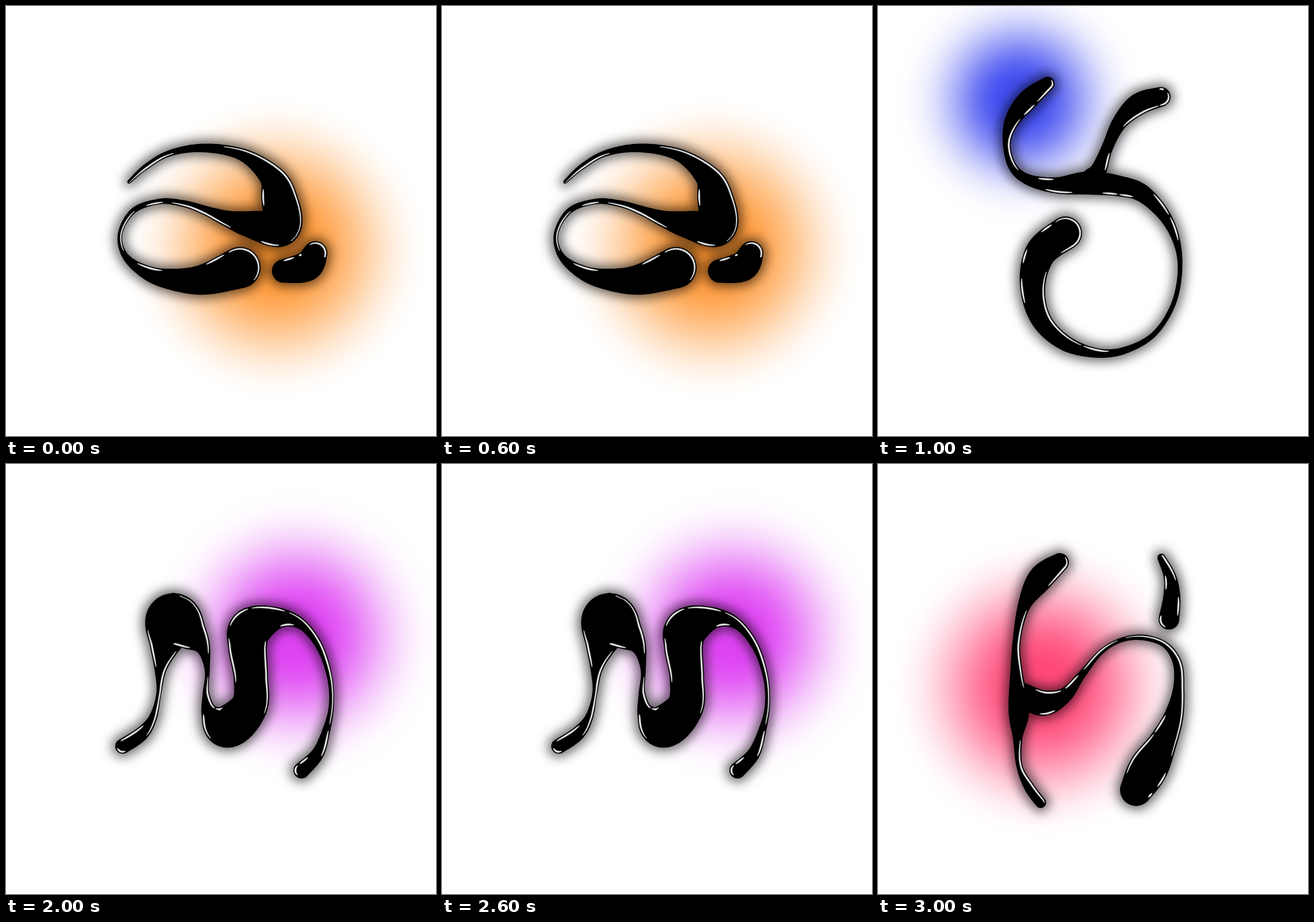
An HTML page with a canvas for the animation above (4 s loop, 748 px wide and 748 px high).

```html
<!DOCTYPE html>
<html lang="en">
<head>
<meta charset="utf-8">
<title>Liquid glyphs</title>
<style>
html, body { margin: 0; width: 100%; height: 100%; overflow: hidden; background: #fff }
canvas { display: block }
</style>
</head>
<body>
<canvas id="stage" width="748" height="748"></canvas>
<script>
const SIZE = 748, HOLD = 1000;
const ctx = document.getElementById('stage').getContext('2d');

// A stroke is a spine of "x,y,radius" keys plus the "from:to" spans of its rim that shine.
// Rim position u, with n the last key: 0..n left side, n..n+1 end cap,
// n+1..2n+1 right side backwards, -1..0 start cap.
const split = (text, mark) => text.trim().split(/\s+/).map(p => p.split(mark).map(Number));
const stroke = (keys, shine) => ({ keys: split(keys, ','), shine: split(shine, ':') });

const glyphs = [
  {
    glow: { x: 470, y: 422, r: 272, rgb: '255,150,50', power: 1.05 },
    strokes: [
      stroke(`214,306,3 243,280,5 285,256,5.5 345,247,7.5 412,259,11 461,296,21 475,333,31 478,384,34
              425,380,23 385,370,14 345,355,8 310,344,6 268,340,4.8 222,356,5 198.5,397,4 209,437,6
              250,466,13 300,477,20 348,475,27 407,455,36`,
             '3.5:7 7.15:7.5 8.7:11.5 11.9:12.5 13:14.7 15.5:16.4 18.2:18.7 18.9:19.8 32.8:33.3 36.9:39'),
      stroke('483,461,20.5 523,453,26 538,430,21', '.2:.6 .9:1.2 2.1:3.2')
    ]
  },
  {
    glow: { x: 247, y: 164, r: 246, rgb: '66,78,240', power: 1.9 },
    strokes: [
      stroke(`295,135,12 261,163,17.5 234,198,13 224,238,7 234,279,7.5 261,302,9.5 310,312,14 365,308,20
              418,313,18 463,328,15 506,377,9.5 525,440,4.5 516.5,511,4 483,568,4.5 435,597,6 385,604,8
              327,587,13.5 284,546,17.5 269,487,22 283,429,27 326,395,29`,
             `-.5:.8 1:1.5 1.8:4.3 5.4:5.9 9.2:9.8 9.9:10.5 17.6:18.2 18.6:18.9 19.4:19.7 20:21.5
              22.5:25.4 25.5:26.3 32.4:32.9 33:33.5 34.5:35.3`),
      stroke('492,158,17 453,171,19 420,203,13 399,246,10 384,285,14 372,300,18',
             '-.95:-.8 -.55:.2 .3:2 3.2:3.9')
    ]
  },
  {
    glow: { x: 506, y: 299, r: 270, rgb: '222,68,243', power: 1.4 },
    strokes: [
      stroke(`203,491,13 236,469,12 256,440,7 266,398,4.5 269,355,11 277,312,27 290,271,46 318,292,30
              342,318,13 350,358,4.5 348,400,6 356,435,16 385,457,36.5 423,422,32 426,372,30 420,315,34
              427,285,36 472,268,18.5 513,278,9.5 545,317,6.5 563,370,4.8 566,420,4.5 557,464,7
              542,504,11 514,533,14`,
             `-.95:-.45 .1:1.3 4.1:5.6 6.1:8.3 9.3:11 11.2:12.2 13.9:15.4 15.7:16.1 16.2:17.2 17.4:21.7
              22:23 24.5:25 25.2:25.6 31.3:32 33.7:36 37.2:38 41.8:42.7 44:47.9`)
    ]
  },
  {
    glow: { x: 284, y: 388, r: 273, rgb: '255,72,120', power: 1.15 },
    strokes: [
      stroke(`316,171,16 283,199,22 254,247,11 241,310,7 241,365,11 245,428,18 243,476,8.5 246,525,5.5
              263,562,9 283,589,9.5`,
             '-.5:1 2.1:4.4 6.1:9.2'),
      stroke(`252,402,21 288,416,22 325,402,13 354,367,7 388,327,4.5 424,306,4 463,302,5 500,315,5.5
              521,347,8 523,392,10 514,440,17 494,487,25 470,530,34 449,567,28`,
             '.5:1.9 2.2:2.9 3.2:4.8 5.2:11.3 11.9:12.3 12.6:12.8 14.6:16.1 16.2:16.9 25.7:26.1'),
      stroke('493,163,7 508,197,11 511,233,15 506,270,18', '-.3:1.2 2:2.7 3.6:4.1 5.4:6.1')
    ]
  }
];

const clamp = (v, lo, hi) => Math.max(lo, Math.min(hi, v));

// Catmull-Rom spine: [x, y, radius] at key position k
function spine(keys, k) {
  const last = keys.length - 1;
  const i = clamp(Math.floor(k), 0, last - 1), t = k - i;
  const [a, b, c, d] = [-1, 0, 1, 2].map(j => keys[clamp(i + j, 0, last)]);
  return b.map((v, j) => v + t / 2 * (c[j] - a[j]
    + t * (2 * a[j] - 5 * v + 4 * c[j] - d[j] + t * (3 * (v - c[j]) + d[j] - a[j]))));
}

// Point just inside the outline at rim position u, with the local radius
function rim(keys, u) {
  const n = keys.length - 1;
  const k = clamp(u > n + 1 ? 2 * n + 1 - u : u, 0, n);
  const [x, y, r] = spine(keys, k);
  const p = spine(keys, Math.max(0, k - .01)), q = spine(keys, Math.min(n, k + .01));
  const [dx, dy, dr] = q.map((v, j) => v - p[j]);
  const side = Math.acos(clamp(-dr / Math.hypot(dx, dy), -.95, .95));
  let turn = side;
  if (u < 0) turn = side - u * 2 * (Math.PI - side);
  else if (u > n) turn = side * (1 - 2 * Math.min(1, u - n));
  const angle = Math.atan2(dy, dx) - turn, inner = r - Math.min(3.4, r * .6);
  return [x + inner * Math.cos(angle), y + inner * Math.sin(angle), r];
}

function drawGlow({ x, y, r, rgb, power }) {
  const g = ctx.createRadialGradient(x, y, 0, x, y, r);
  for (let t = 0; t <= 1; t += 1 / 32) {
    const fall = clamp((t - .1) / .9, 0, 1);
    const alpha = ((1 + Math.cos(Math.PI * fall)) / 2) ** power;
    g.addColorStop(t, `rgba(${rgb},${alpha.toFixed(4)})`);
  }
  ctx.fillStyle = g;
  ctx.fillRect(0, 0, SIZE, SIZE);
}

function fillStrokes(strokes, spread, shift = 0) {
  ctx.fillStyle = '#000';
  ctx.beginPath();
  for (const { keys } of strokes) {
    const steps = (keys.length - 1) * 40;
    for (let s = 0; s <= steps; s++) {
      const [x, y, r] = spine(keys, s / 40);
      ctx.moveTo(x - shift + r + spread, y);
      ctx.arc(x - shift, y, r + spread, 0, 2 * Math.PI);
    }
  }
  ctx.fill();
}

// Only the shadow lands on the stage; the shapes casting it lie outside
function drawShadow(strokes) {
  ctx.save();
  ctx.shadowColor = 'rgba(0,0,0,.6)';
  ctx.shadowBlur = 19;
  ctx.shadowOffsetX = 2 * SIZE;
  fillStrokes(strokes, 6, 2 * SIZE);
  ctx.restore();
}

// Tapered highlight with a soft grey edge
function drawShine(keys, [from, to]) {
  const steps = Math.ceil((to - from) * 14) + 4;
  const line = Array.from({ length: steps + 1 }, (_, i) => rim(keys, from + (to - from) * i / steps));
  for (const [color, extra] of [['#666', .4], ['#e6e6e6', -.9]]) {
    ctx.strokeStyle = color;
    for (let i = 1; i <= steps; i++) {
      const taper = .4 + .6 * Math.sin(Math.PI * (i - .5) / steps) ** .6;
      ctx.lineWidth = Math.max(.4, Math.min(3.3, line[i][2] * .6) * taper + extra);
      ctx.beginPath();
      ctx.moveTo(line[i - 1][0], line[i - 1][1]);
      ctx.lineTo(line[i][0], line[i][1]);
      ctx.stroke();
    }
  }
}

function draw({ glow, strokes }) {
  ctx.fillStyle = '#fff';
  ctx.fillRect(0, 0, SIZE, SIZE);
  ctx.lineCap = 'round';
  drawGlow(glow);
  drawShadow(strokes);
  fillStrokes(strokes, 0);
  for (const { keys, shine } of strokes) shine.forEach(span => drawShine(keys, span));
}

let shown = -1;
const start = performance.now();
function tick() {
  const i = Math.floor((performance.now() - start) / HOLD) % glyphs.length;
  if (i !== shown) draw(glyphs[shown = i]);
  requestAnimationFrame(tick);
}
tick();
</script>
</body>
</html>
```
